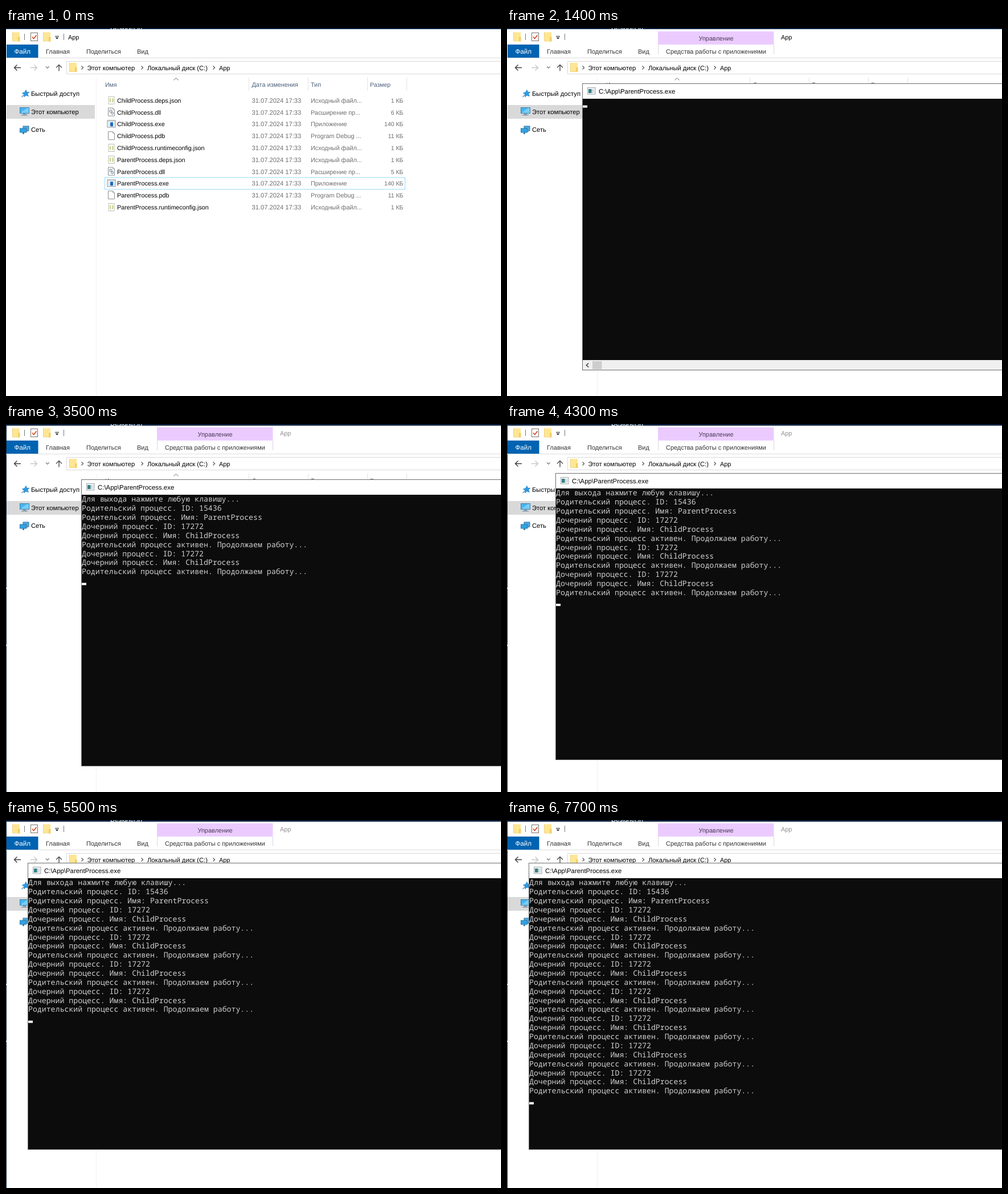
Animation, 869 px wide and 645 px high, one loop 8000 ms. Source, as an HTML page:

```html
<!DOCTYPE html>
<html lang="ru">
<head>
<meta charset="utf-8">
<title>Процессы</title>
<style>
  html, body { margin: 0; width: 100%; height: 100%; overflow: hidden; background: #fff; }
  svg { display: block; width: 869px; height: 645px; }
  text { font: 11px "Liberation Sans", Arial, sans-serif; text-rendering: geometricPrecision; white-space: pre; }
  .console { font: 13.21px "Noto Sans Mono", "Liberation Mono", monospace; fill: #d0d0d0; }
</style>
</head>
<body>
<svg id="stage" viewBox="0 0 869 645"></svg>
<script>
const LOOP = 8000;
const ROW = 20.8, LINE = 15.87;

const rect = (x, y, w, h, fill, extra = "") =>
  `<rect x="${x}" y="${y}" width="${w}" height="${h}" fill="${fill}" ${extra}/>`;
const path = (d, stroke, width = 1, fill = "none") =>
  `<path d="${d}" stroke="${stroke}" stroke-width="${width}" fill="${fill}"/>`;
const text = (x, y, str, size = 11, fill = "#000", extra = "") =>
  `<text x="${x}" y="${y}" fill="${fill}" style="font-size:${size}px" ${extra}>${str}</text>`;
const group = (id, body) => `<g id="${id}">${body}</g>`;
const at = (x, y, body) => `<g transform="translate(${x} ${y})">${body}</g>`;

// Icons
const folder = (x, y) => at(x, y,
  rect(0, 0, 13, 15, "#ffe694") + rect(10, 8, 3.5, 8, "#f3cf62") + path("M.5 0V15.5H13", "#f0d27a"));
const page = path("M.5 .5H8.5L11.5 3.5V14.5H.5Z", "#8d8d8d", 1, "#fff") + path("M8.5 .5V3.5H11.5", "#a8a8a8");
const icons = {
  json: at(179.5, -7, rect(.5, .5, 10, 13, "#fff", 'stroke="#b9bdb4"') +
    path("M4.5 4Q3 4 3.3 7Q3 10 4.5 10M6.8 4Q8.3 4 8 7Q8.3 10 6.8 10", "#a9b53f", 1.2)),
  dll: at(179, -8, page +
    `<circle cx="4.8" cy="6" r="2.3" fill="#dfe8ef" stroke="#71899c"/><circle cx="7.8" cy="9.8" r="2" fill="#dfe8ef" stroke="#71899c"/>`),
  exe: at(177.5, -7, rect(.5, .5, 14, 12, "#fff", 'stroke="#868b91"') + rect(1, 1, 13, 2, "#c9ced4") +
    rect(2.5, 4, 2, 7, "#d8dde2") + rect(5.5, 4, 5, 7, "#1769bd") + rect(11.5, 4, 1.5, 7, "#d8dde2")),
  pdb: at(179, -8, page)
};
const monitor = at(24, 139,
  rect(.5, .5, 16, 10, "#45b4ee", 'stroke="#3f7fae"') + path("M1 10L13 1H16V10Z", "none", 0, "#77cdf7") +
  rect(6, 11, 5, 2, "#8ba2b3") + rect(3, 13, 11, 1.2, "#6b8ba3"));
const network = at(24, 171,
  rect(6, 1, 10, 8, "#4da9de", 'stroke="#3879a6"') + rect(.5, 5, 11, 7, "#31a3e3", 'stroke="#2f79ab"') +
  rect(5, 12, 3, 3, "#3d83b1") + path("M12 11L16 8", "#6d91a9", 1.5));
const star = path("M35 108.5L36.6 112.3L40.8 112.4L37.8 115.4L39.4 119.6L35.2 117.9L31.6 120.8L31.8 116.5L28.4 114L32.6 112.8Z",
  "#1a79bd", .7, "#2e9ae4") + path("M27.5 121L31 117.6", "#5c7f98", 1.2);

// File list
const kinds = {
  json: ["Исходный файл...", "1 КБ"],
  dll: ["Расширение пр...", "6 КБ"],
  exe: ["Приложение", "140 КБ"],
  pdb: ["Program Debug ...", "11 КБ"]
};
const files = ["Child", "Parent"].flatMap(owner =>
  ["deps.json", "dll", "exe", "pdb", "runtimeconfig.json"].map(ext => ({ owner, ext })));
const rowBox = (id, i, fill, stroke) =>
  rect(173.5, 116.6 + i * ROW, 527, 20.5, fill, `stroke="${stroke}" id="${id}"`);

function fileRow({ owner, ext }, i) {
  const kind = ext.split(".").pop();
  const [type, size] = kinds[kind];
  const gray = "#6d6d6d";
  const shown = kind === "dll" && owner === "Parent" ? "5 КБ" : size;
  return at(0, 126.8 + i * ROW,
    icons[kind] +
    text(195, 4, `${owner}Process.${ext}`, 10.75) +
    text(431.5, 4, "31.07.2024 17:33", 11.15, gray) +
    text(535, 4, type, 10.85, gray) +
    text(697.5, 4, shown, 10.5, gray, 'text-anchor="end"'));
}

const chevron = x => path(`M${x} 66.5L${x + 3} 69.5L${x} 72.5`, "#555", 1.2);
const heading = "#4c607a";

const explorer =
  rect(0, 0, 869, 645, "#fff") +
  rect(0, 0, 869, 2, "#04203c") +
  group("inactiveEdge", rect(0, 2, 869, 1, "#26384c") + rect(0, 0, 1, 645, "#0b2340") +
    rect(0, 287, 1, 2, "#dde") + rect(0, 387, 1, 2, "#dde")) +
  text(183, 2.6, "Designer.ln", 11.2, "#fff") +
  folder(11, 7.5) + folder(65, 7.5) +
  path("M32.5 10V21M101.5 10V21", "#777") +
  rect(43.5, 8.5, 12, 14, "#fff", 'stroke="#77736f"') + path("M46 15.5L48.7 18.5L53.5 12.5", "#d9512c", 1.8) +
  path("M86 14.5H93", "#222") + path("M86.5 16.5H92.5L89.5 19.5Z", "none", 0, "#222") +
  rect(127.5, 29.5, 87, 22, "#f7f9fb", 'stroke="#e6e9ec" id="tabHover"') +
  path("M0 52.5H869", "#dcdddf") +
  rect(1, 29, 55.5, 23, "#0063b1") + text(14.5, 44.5, "Файл", 11.6, "#fff") +
  text(70, 44.5, "Главная", 11, "#333") + text(141, 44.5, "Поделиться", 11, "#333") + text(230, 44.5, "Вид", 11, "#333") +
  group("tools",
    rect(265, 6, 203.5, 23, "#ebcbff") +
    path("M265.5 29V46M468.5 29V46", "#dfd3e6") +
    text(367, 21.5, "Управление", 11, "#4a3a55", 'text-anchor="middle"') +
    text(279, 44.5, "Средства работы с приложениями", 10.95, "#333")) +
  text(109, 20, "App", 10.9, "#000", 'id="title"') +
  path("M26 69.5H14.5M19.5 64.5L14.5 69.5L19.5 74.5", "#3c3c3c", 1.4) +
  path("M43 69.5H54.5M49.5 64.5L54.5 69.5L49.5 74.5", "#c6c6c6", 1.4) +
  path("M70 67.5L72.8 70.3L75.6 67.5", "#777", 1.2) +
  path("M93 75.5V64.5M88 69.5L93 64.5L98 69.5", "#555", 1.5) +
  path("M870 58.5H106.5V80.5H870", "#d9d9d9") +
  folder(111, 61) + chevron(132.5) + chevron(237.5) + chevron(363.5) +
  text(142.5, 73.5, "Этот компьютер", 11.2) + text(248, 73.5, "Локальный диск (C:)", 11.2) + text(374, 73.5, "App", 10.9) +
  path("M158.5 87V645", "#f1f1f1") +
  rect(1, 135, 155, 24, "#d9d9d9") + star + monitor + network +
  text(44, 119, "Быстрый доступ", 11.2) + text(44, 150.8, "Этот компьютер", 11.2) + text(44, 182.3, "Сеть", 11.2) +
  path("M426.5 87V110M530.5 87V110M634.5 87V110M703.5 87V110", "#e3e3e3") +
  path("M294.5 91.5L298.5 87.7L302.5 91.5", "#666") +
  text(174, 103.2, "Имя", 10.5, heading) + text(431.5, 103.2, "Дата изменения", 10.8, heading) +
  text(535, 103.2, "Тип", 10.8, heading) + text(639, 103.2, "Размер", 10.5, heading) +
  rowBox("focusRow", 7, "#fff", "#99d8f7") + rowBox("passRow", 3, "#e5f3ff", "#e5f3ff") +
  rowBox("hoverRow", 7, "#e5f3ff", "#99d1ff") + rowBox("pickRow", 7, "#cce8ff", "#99d1ff") +
  files.map(fileRow).join("");

// Console window, wide enough to reach past the right edge after the drag
const WIDE = 900;
const intro = ["Для выхода нажмите любую клавишу...", "Родительский процесс. ID: 15436", "Родительский процесс. Имя: ParentProcess"];
const report = ["Дочерний процесс. ID: 17272", "Дочерний процесс. Имя: ChildProcess", "Родительский процесс активен. Продолжаем работу..."];
const lines = intro.concat(...Array(7).fill(report));

const consoleWindow =
  rect(132, 97, WIDE, 503, "#6e6e6e") +
  rect(133, 98, WIDE, 26, "#fff") +
  rect(133, 124, WIDE, 475, "#0c0c0c") +
  at(141, 104, rect(.5, .5, 13.5, 11.5, "#f4f6f7", 'stroke="#a2a7ab"') +
    rect(2, 3, 5.5, 7, "#337f86") + rect(8.5, 3, 1.5, 7, "#b8c6ca") + rect(11, 3, 1.5, 7, "#d3dadd")) +
  text(161, 115, "C:\\App\\ParentProcess.exe", 11.4) +
  group("scrollbar", rect(133, 582, WIDE, 17, "#f0f0f0") + rect(150, 584, 16.5, 14, "#cdcdcd") +
    path("M143.3 587.5L139.3 591L143.3 594.5", "#404040", 1.6)) +
  lines.map((s, i) => `<text class="console" x="133" y="${124 + i * LINE + 12.3}">${s}</text>`).join("") +
  rect(133, 0, 8, 4, "#fff", 'id="cursor"');

const stage = document.getElementById("stage");
stage.innerHTML = explorer + group("win", consoleWindow);
const el = id => document.getElementById(id);
const rows = [...stage.querySelectorAll(".console")];
const show = (node, on) => node.setAttribute("visibility", on ? "inherit" : "hidden");

// Times when output arrives: three more lines each
const output = [1500, 1600, 2600, 3700, 4700, 5700, 6700, 7700];
// Times when the cursor toggles
const blinks = [1900, 2100, 2400, 3000, 3200, 3500, 4000, 4200, 4500,
  5000, 5200, 5500, 6000, 6200, 6500, 7000, 7200, 7500];
const passed = (list, t) => list.filter(x => x <= t).length;

function render(t) {
  const picked = t >= 700, open = t >= 1400, running = t >= 1500;
  show(el("tabHover"), t >= 200 && t < 300);
  show(el("passRow"), t >= 300 && t < 400);
  show(el("hoverRow"), t >= 400 && !picked);
  show(el("pickRow"), picked);
  show(el("tools"), picked);
  show(el("inactiveEdge"), running);
  el("title").setAttribute("x", picked ? 481 : 109);
  el("title").setAttribute("fill", running ? "#8e8e8e" : "#000");

  show(el("win"), open);
  if (!open) return;
  show(el("scrollbar"), !running);
  const count = 3 * passed(output, t);
  rows.forEach((row, i) => show(row, i < count));
  el("cursor").setAttribute("y", 124 + count * LINE + 11.6);
  show(el("cursor"), passed(blinks, t) % 2 === 0);

  // The drag is seen in steps of 100 ms
  const p = Math.min(1, Math.max(0, (Math.floor(t / 100) * 100 - 4000) / 600));
  const drag = p * p * (3 - 2 * p);
  el("win").setAttribute("transform", `translate(${Math.round(-94 * drag)} ${Math.round(-22 * drag)})`);
}

const start = performance.now();
function tick() {
  render((performance.now() - start) % LOOP);
  requestAnimationFrame(tick);
}
tick();
</script>
</body>
</html>
```
